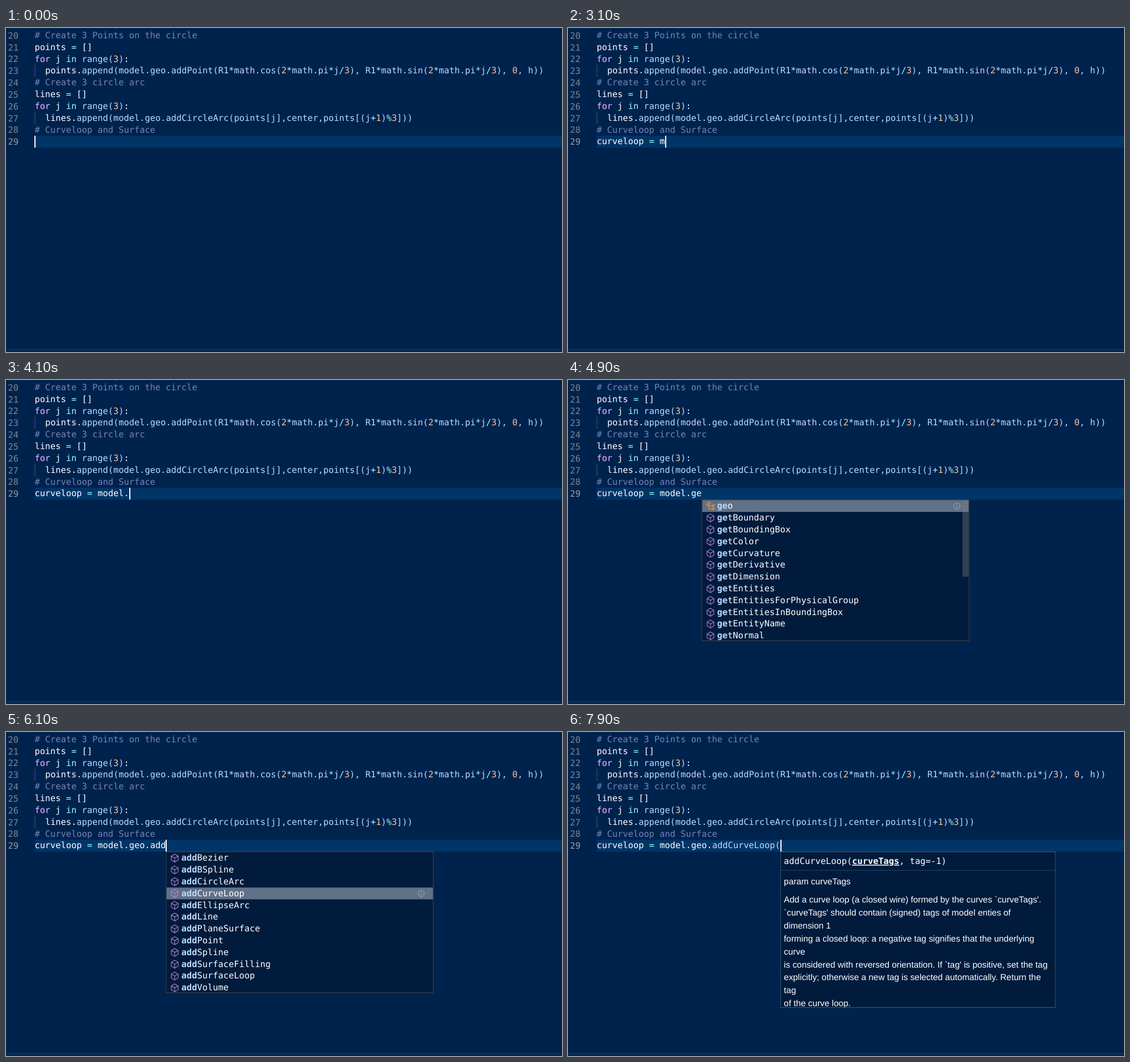
An HTML page that plays this animation: 979x572 px, repeating every 8000 ms.

```html
<!DOCTYPE html>
<html lang="en">
<head>
<meta charset="utf-8">
<title>Code editor typing</title>
<style>
  html, body { margin: 0; width: 100%; height: 100%; overflow: hidden; background: #00234e; }
  svg { display: block; }
  text { font: 15.35px "DejaVu Sans Mono", monospace; white-space: pre; fill: #fff; text-rendering: geometricPrecision; }
  .doc { font-family: "Liberation Sans", Arial, sans-serif; }
  .abc { font: 10.4px "Noto Sans", sans-serif; fill: #b9c2cd; }
  .number { fill: #858585; }
  .active { fill: #9c9c9c; }
  .hit { font-weight: bold; fill: #bbdaff; }
  .param { font-weight: bold; text-decoration: underline; }
  .icon { fill: none; stroke-width: 1; }
</style>
</head>
<body>
<svg id="stage" width="979" height="572" viewBox="0 0 979 572">
  <g id="page"></g>
  <g id="live"></g>
</svg>
<script>
const LOOP = 8000;
const LEFT = 50.4, CHAR = 9.24, LINE = 20.83, BASE = 15.1, PX = 1.0965;
const ACTIVE_TOP = 190.3, POPUP_TOP = 211, POPUP_WIDTH = 471.5, MAX_ROWS = 12;
const COLOR = {
  plain: '#fff', comment: '#7285b7', keyword: '#ebbbff', operator: '#99ffff',
  number: '#ffc58f', call: '#bbdaff', widget: '#001b3c', selected: '#607188'
};

const CODE = [
  'center = model.geo.addPoint(0, 0, h)',
  '# Create 3 Points on the circle',
  'points = []',
  'for j in range(3):',
  '  points.append(model.geo.addPoint(R1*math.cos(2*math.pi*j/3), R1*math.sin(2*math.pi*j/3), 0, h))',
  '# Create 3 circle arc',
  'lines = []',
  'for j in range(3):',
  '  lines.append(model.geo.addCircleArc(points[j],center,points[(j+1)%3]))',
  '# Curveloop and Surface'
];

const items = (icon, labels) => labels.split('|').map(label => ({ icon, label }));
const LISTS = {
  words: items('abc', 'Curveloop'),
  names: [
    ...items('variable', 'model'),
    ...items('type', 'math|map|max'),
    ...items('method', 'min'),
    ...items('type', 'ModuleNotFoundError|memoryview|MemoryError'),
    ...items('snippet', 'mark/markdown|def(abstract class method)|def(class method)|def(static class method)')
  ],
  model: [
    ...items('method', 'add|addDiscreteEntity|addPhysicalGroup'),
    ...items('type', 'geo'),
    ...items('method', 'getBoundary|getBoundingBox|getColor|getCurvature|getDerivative|getDimension|getEntities|' +
      'getEntitiesForPhysicalGroup|getEntitiesInBoundingBox|getEntityName|getNormal')
  ],
  geo: items('method', 'addBezier|addBSpline|addCircleArc|addCurveLoop|addEllipseArc|addLine|addPlaneSurface|' +
    'addPoint|addSpline|addSurfaceFilling|addSurfaceLoop|addVolume')
};
const PRESELECT = { model: 'geo', geo: 'addCurveLoop' };

const ICONS = {
  variable: ['#ee9d28', 'M7.5 6V3.2L8.2 2.5H13.8L14.5 3.2V7.8L13.8 8.5H10M9 4.5H13M9 6.5H13M1.5 7.5H8.5V13.5H1.5ZM3 9.5H7M3 11.5H7'],
  type: ['#ee9d28', 'M5.4 1.4L7.4 3.4L3.4 7.3L1.4 5.3ZM5.4 5.5V12.4H10.5M5.4 7.3H10.5M13 5.4l1.3 1.3-2.6 2.6-1.3-1.3zM13 10.4l1.3 1.3-2.6 2.6-1.3-1.3z'],
  method: ['#b180d7', 'M8 1.5L13.5 4.8V10.9L8 14.3L2.5 10.9V4.8ZM2.5 4.8L8 7.8L13.5 4.8M8 7.8V14.3'],
  snippet: ['#cccccc', 'M2.5 13V1.5H14.5V13M2 14.5h1m1 0h1m1 0h1m1 0h1m1 0h1m1 0h1m1 0h1']
};

// time, typed text, and what is shown beside it (total: entries behind the scrollbar)
const STEPS = [
  [0, ''],
  [300, '', { off: 1 }],
  [700, ''],
  [900, 'cu'],
  [1000, 'cur', { list: 'words' }],
  [1200, 'curv'],
  [1400, 'curve'],
  [1500, 'curve', { list: 'words' }],
  [1800, 'curve', { list: 'words', off: 1 }],
  [2000, 'curvel', { list: 'words' }],
  [2200, 'curvelo', { list: 'words' }],
  [2300, 'curveloo', { list: 'words' }],
  [2600, 'curveloop'],
  [2700, 'curveloop ='],
  [2800, 'curveloop = '],
  [3100, 'curveloop = m'],
  [3200, 'curveloop = m', { list: 'names' }],
  [3300, 'curveloop = mo', { list: 'names' }],
  [3400, 'curveloop = mod', { list: 'names' }],
  [3500, 'curveloop = mode', { list: 'names' }],
  [3800, 'curveloop = model'],
  [4100, 'curveloop = model.'],
  [4200, 'curveloop = model.', { list: 'model', total: 30 }],
  [4300, 'curveloop = model.g', { list: 'model', total: 22 }],
  [4400, 'curveloop = model.ge', { list: 'model', total: 22 }],
  [4900, 'curveloop = model.ge', { list: 'model', total: 22, off: 1 }],
  [5000, 'curveloop = model.geo'],
  [5500, 'curveloop = model.geo', { off: 1 }],
  [5600, 'curveloop = model.geo.'],
  [5700, 'curveloop = model.geo.', { list: 'geo', total: 28 }],
  [6000, 'curveloop = model.geo.ad', { list: 'geo' }],
  [6100, 'curveloop = model.geo.add', { list: 'geo' }],
  [6500, 'curveloop = model.geo.addC', { list: 'geo' }],
  [6600, 'curveloop = model.geo.addCu', { list: 'geo' }],
  [6800, 'curveloop = model.geo.addCu', { list: 'geo', squiggle: 1 }],
  [7000, 'curveloop = model.geo.addCurveLoop', { squiggle: 1 }],
  [7300, 'curveloop = model.geo.addCurveLoop'],
  [7500, 'curveloop = model.geo.addCurveLoop', { off: 1 }],
  [7800, 'curveloop = model.geo.addCurveLoop('],
  [7900, 'curveloop = model.geo.addCurveLoop(', { hint: 1 }]
];

const DOC = [
  "Add a curve loop (a closed wire) formed by the curves `curveTags'.",
  "`curveTags' should contain (signed) tags of model enties of",
  'dimension 1',
  'forming a closed loop: a negative tag signifies that the underlying',
  'curve',
  "is considered with reversed orientation. If `tag' is positive, set the tag",
  'explicitly; otherwise a new tag is selected automatically. Return the',
  'tag',
  'of the curve loop.'
];

const column = n => LEFT + n * CHAR;
const text = (x, y, body, cls = '') => `<text x="${x}" y="${y}" class="${cls}">${body}</text>`;
const rect = (x, y, w, h, fill) => `<rect x="${x}" y="${y}" width="${w}" height="${h}" fill="${fill}"/>`;
const span = (fill, s) => `<tspan fill="${fill}">${s}</tspan>`;

function highlight(line) {
  if (line.startsWith('#')) return span(COLOR.comment, line);
  const start = line.search(/\w+\(/);
  const end = line.lastIndexOf(')') + 1 || line.length;
  return line.replace(/\b(for)\b|(\bin\b|[=*\/%+])|\b(\d+)|\w+|./g, (s, keyword, operator, number, at) => {
    const inCall = start >= 0 && at >= start && at < end;
    const kind = keyword ? 'keyword' : operator ? 'operator' : number ? 'number' : inCall ? 'call' : 'plain';
    return span(COLOR[kind], s);
  });
}

function subsequence(pattern, label) {
  const hits = [];
  let from = 0;
  for (const c of pattern.toLowerCase()) {
    const at = label.toLowerCase().indexOf(c, from);
    if (at < 0) return null;
    hits.push(at);
    from = at + 1;
  }
  return hits;
}

// Fuzzy match that also accepts two swapped neighbours
function match(pattern, label) {
  let hits = subsequence(pattern, label);
  for (let i = 0; !hits && i < pattern.length - 1; i++) {
    hits = subsequence(pattern.slice(0, i) + pattern[i + 1] + pattern[i] + pattern.slice(i + 2), label);
  }
  return hits;
}

function icon(name, x, y) {
  if (name === 'abc') return text(x - .5, y + 12.6, 'abc', 'abc');
  const [stroke, d] = ICONS[name];
  return `<path class="icon" stroke="${stroke}" d="${d}" transform="translate(${x} ${y}) scale(${PX})"/>`;
}

function infoIcon(x, y) {
  return `<g class="icon" stroke="#fff" stroke-opacity=".42"><circle cx="${x}" cy="${y}" r="5.4"/>` +
    `<path d="M${x} ${y - 3}v1.3M${x} ${y - .6}v3.6"/></g>`;
}

function panel(x, w, h, border, body) {
  return `<svg x="${x}" y="${POPUP_TOP}" width="${w}" height="${h}">${rect(0, 0, w, h, COLOR.widget)}${body}` +
    `<rect x=".55" y=".55" width="${w - 1.1}" height="${h - 1.1}" fill="none" stroke="${border}" stroke-width="1.1"/></svg>`;
}

function suggestions(typed, list, total) {
  const prefix = typed.match(/\w*$/)[0];
  const rows = LISTS[list]
    .map(item => ({ ...item, hits: match(prefix, item.label) }))
    .filter(item => item.hits)
    .sort((a, b) => (a.hits[0] > 0) - (b.hits[0] > 0))
    .slice(0, MAX_ROWS);
  const selected = Math.max(0, rows.findIndex(row => row.label === PRESELECT[list]));
  const height = rows.length * LINE;

  let body = '';
  rows.forEach((row, i) => {
    const y = PX + i * LINE;
    if (i === selected) {
      body += rect(PX, y, POPUP_WIDTH - 2 * PX, LINE, COLOR.selected);
      if (row.icon !== 'abc') body += infoIcon(449.6, y + 10.4);
    }
    const label = [...row.label]
      .map((c, n) => row.hits.includes(n) ? `<tspan class="hit">${c}</tspan>` : c).join('');
    body += icon(row.icon, 6.9, y + 1.8) + text(27.4, y + BASE, label);
  });
  if (total) {
    const track = height - 2 * PX;
    body += rect(POPUP_WIDTH - 12, PX, 11, track * MAX_ROWS / total, 'rgba(121,121,121,.4)');
  }
  return panel(column(typed.length), POPUP_WIDTH, height, '#454545', body);
}

function signatureHint(typed) {
  const x = 6.5;
  const body = text(x, 22.3, 'addCurveLoop(<tspan class="param">curveTags</tspan>, tag=-1)') +
    rect(1, 32.8, 483, 1.1, '#24405f') +
    text(x, 58.4, 'param curveTags', 'doc') +
    DOC.map((line, i) => text(x, 90.3 + i * 22.85, line, 'doc')).join('');
  return panel(column(typed.length) - .2, 485, 276, '#445973', body);
}

function squiggle(from, to) {
  const half = 3 * PX;
  let d = `M${column(from)} 211`;
  for (let x = half, up = true; x <= (to - from) * CHAR; x += half, up = !up) {
    d += `L${column(from) + x} ${up ? 208 : 211}`;
  }
  return `<path class="icon" stroke="#75beff" d="${d}"/>`;
}

function drawPage() {
  let out = rect(LEFT, ACTIVE_TOP, 979 - LEFT, LINE, '#003567') + rect(0, 567.6, 979, 1.1, '#1c3e64');
  CODE.forEach((line, i) => {
    const y = ACTIVE_TOP + (i - CODE.length) * LINE;
    if (line.startsWith(' ')) out += rect(LEFT, y, 1.1, LINE, '#404f7d');
    out += text(LEFT, y + BASE, highlight(line));
    if (i) out += text(3.5, y + BASE + .8, 19 + i, 'number');
  });
  return out + text(3.5, ACTIVE_TOP + BASE + .8, 29, 'number active');
}

function drawLive([, typed, { list, total, off, squiggle: wavy, hint } = {}]) {
  let out = text(LEFT, ACTIVE_TOP + BASE, highlight(typed));
  if (wavy) out += squiggle(22, 27);
  if (list) out += suggestions(typed, list, total);
  if (hint) out += signatureHint(typed);
  if (!off) out += rect(Math.round(column(typed.length)), ACTIVE_TOP, 2, LINE, '#fff');
  return out;
}

const live = document.getElementById('live');
document.getElementById('page').innerHTML = drawPage();
const begin = performance.now();
let shown;

function tick() {
  const t = (performance.now() - begin) % LOOP;
  const step = STEPS.findLast(s => s[0] <= t);
  if (step !== shown) {
    live.innerHTML = drawLive(step);
    shown = step;
  }
  requestAnimationFrame(tick);
}
tick();
</script>
</body>
</html>
```
